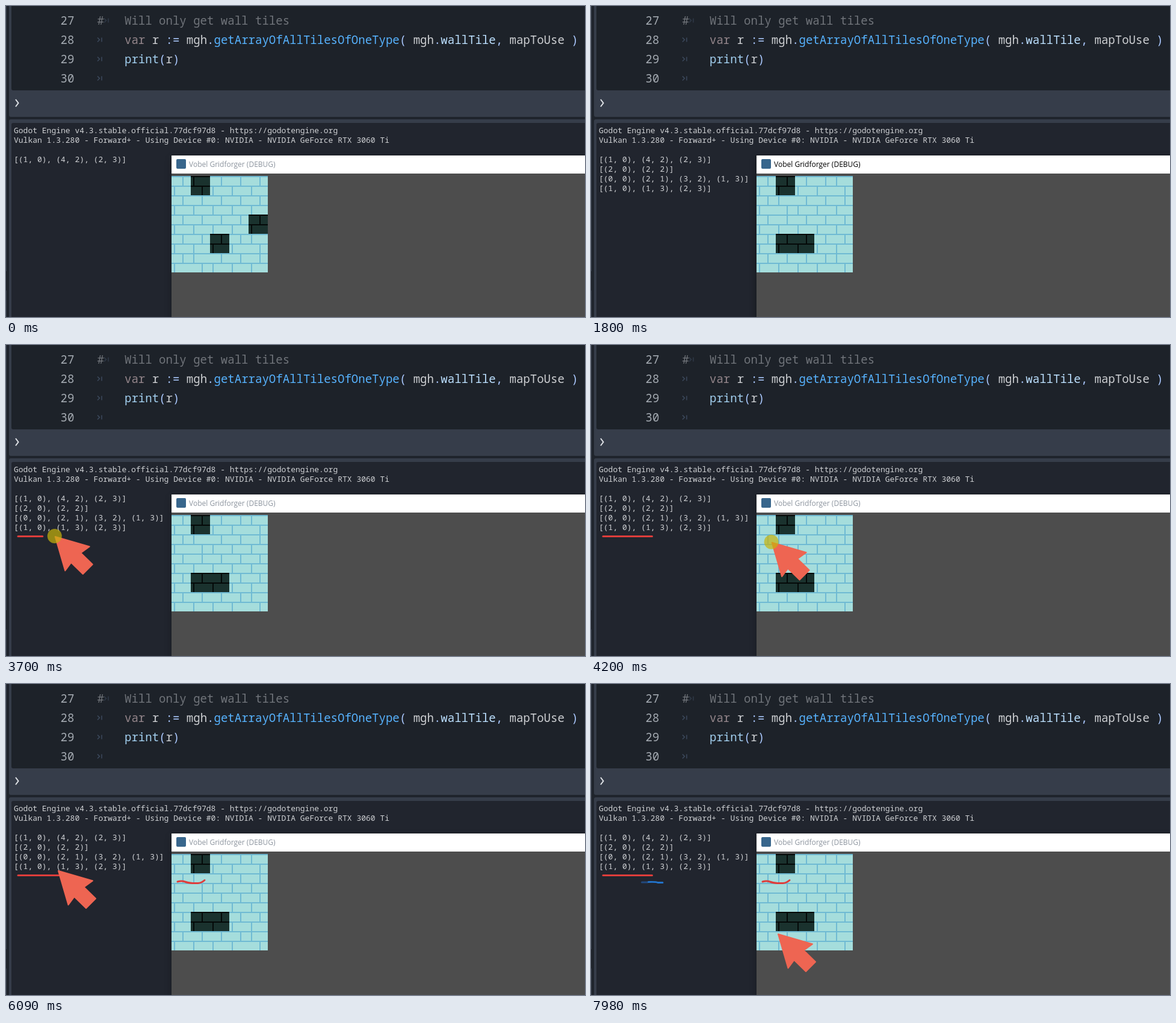
An HTML page for the animation above (8 s loop, 962 by 516 pixels).

```html
<!DOCTYPE html>
<html lang="en">
<head>
<meta charset="utf-8">
<title>Wall tiles</title>
<style>
  html, body { margin: 0; width: 100%; height: 100%; overflow: hidden; background: #21252e; }
  svg { display: block; width: 962px; height: 516px; }
  text { white-space: pre; }
  .code { font: 19.05px "Noto Sans Mono", monospace; fill: #cdcfd2; }
  .log { font: 13px "Noto Sans Mono", monospace; fill: #cfd1d4; }
  .title { font: 12px "Open Sans", "Noto Sans", sans-serif; }
  .num { fill: #a3a9b0; }
  .note { fill: #70747a; }
  .word { fill: #93858a; }
  .sym { fill: #abc9ff; }
  .fn { fill: #57b3ff; }
  .prop { fill: #bce0ff; }
  .call { fill: #a3d0f0; }
  .tab { fill: none; stroke: #3d4a5e; stroke-width: 1.5; }
  .ink { fill: none; stroke-width: 3; stroke-linecap: round; stroke-linejoin: round; }
  .crisp { shape-rendering: crispEdges; }
</style>
</head>
<body>
<svg viewBox="0 0 962 516">
  <defs>
    <filter id="soft" x="-10%" y="-10%" width="120%" height="120%"><feGaussianBlur stdDeviation="6"/></filter>
    <path id="tab" class="tab" d="M1 -3.5L4.500 0L1 3.500M8 -3.500V3.500"/>
  </defs>

  <rect width="962" height="516" fill="#1f242c"/>
  <path class="crisp" d="M0 0H1V440H0ZM0 472H1V516H0Z" fill="#343b48"/>
  <path d="M5 0H962V184H8Q5 184 5 181Z" fill="#363d4a"/>
  <path d="M9 0H962V140H12Q9 140 9 137Z" fill="#1d2229"/>
  <path d="M5 516V191Q5 188 8 188H962V516Z" fill="#363d4a"/>
  <path d="M9 516V197Q9 194 12 194H962V516Z" fill="#21252e"/>
  <path d="M16 155L20.500 161L16 167" fill="none" stroke="#dfe2e6" stroke-width="2"/>

  <g class="code">
    <text class="num" x="90.5" y="31">27</text>
    <text class="num" x="90.5" y="63">28</text>
    <text class="num" x="90.5" y="95">29</text>
    <text class="num" x="90.5" y="127">30</text>
    <use href="#tab" x="162" y="24" opacity=".6"/>
    <use href="#tab" x="151" y="56"/>
    <use href="#tab" x="151" y="88"/>
    <use href="#tab" x="151" y="120"/>
    <text class="note" x="151.5" y="31">#</text>
    <text class="note" x="197" y="31">Will only get wall tiles</text>
    <text x="197" y="63"><tspan class="word">var</tspan> r <tspan class="sym">:=</tspan> mgh<tspan class="sym">.</tspan><tspan class="fn">getArrayOfAllTilesOfOneType</tspan><tspan class="sym">(</tspan> mgh<tspan class="sym">.</tspan><tspan class="prop">wallTile</tspan><tspan class="sym">,</tspan> mapToUse <tspan class="sym">)</tspan></text>
    <text x="197" y="95"><tspan class="call">print</tspan><tspan class="sym">(</tspan>r<tspan class="sym">)</tspan></text>
  </g>

  <g class="log" id="log">
    <text x="13" y="211">Godot Engine v4.3.stable.official.77dcf97d8 - https://godotengine.org</text>
    <text x="13" y="227">Vulkan 1.3.280 - Forward+ - Using Device #0: NVIDIA - NVIDIA GeForce RTX 3060 Ti</text>
  </g>

  <rect id="shade" x="275" y="252" width="720" height="300" filter="url(#soft)"/>
  <g class="crisp">
    <rect x="274" y="247" width="688" height="269" fill="#1d2026"/>
    <rect x="275" y="248" width="687" height="30" fill="#fff"/>
    <rect x="275" y="278" width="687" height="238" fill="#4d4d4d"/>
  </g>
  <rect x="283" y="254" width="16" height="16" rx="2" fill="#38668c"/>
  <text class="title" id="title" x="304" y="267">Vobel Gridforger (DEBUG)</text>
  <g class="crisp" id="maps" transform="translate(275 282)"></g>

  <g id="inks"></g>
  <g id="pointer">
    <path d="M1 1L58 17.500L43.500 28L63 47L47 63L27.500 44L17.500 57.500Z" fill="#ee6552" stroke="#ee6552" stroke-width="2" stroke-linejoin="round"/>
    <circle id="press" r="12" fill="#c8b40c" opacity=".7"/>
  </g>
</svg>
<script>
const LOOP = 8000, STEP = 100;
const TILE = 32, SIZE = 5;
const RED = "#df3d3b", NAVY = "#23497c", BLUE = "#2273cb";
const $ = id => document.getElementById(id);

function add(parent, tag, attrs = {}) {
  const el = document.createElementNS("http://www.w3.org/2000/svg", tag);
  for (const key in attrs) el.setAttribute(key, attrs[key]);
  parent.append(el);
  return el;
}

const show = (el, on) => el.setAttribute("visibility", on ? "visible" : "hidden");
const clamp = v => Math.max(0, Math.min(1, v));
const lerp = (a, b, k) => a + (b - a) * k;
const smooth = k => k * k * (3 - 2 * k);

const rounds = [
  { at: 0, logAt: 0, walls: "(1, 0), (4, 2), (2, 3)" },
  { at: 500, logAt: 600, walls: "(2, 0), (2, 2)" },
  { at: 1200, logAt: 1300, walls: "(0, 0), (2, 1), (3, 2), (1, 3)" },
  { at: 1800, logAt: 1800, walls: "(1, 0), (1, 3), (2, 3)" }
];

function drawTile(parent, col, row, wall, flipped) {
  const x = col * TILE, y = row * TILE;
  const [top, low] = flipped ? [5, 19] : [19, 5];
  add(parent, "rect", { x, y, width: TILE, height: TILE, fill: wall ? "#1a322e" : "#a5dddc" });
  add(parent, "path", {
    d: `M${x} ${y + 1}h32m-32 16h32M${x + top} ${y}v16M${x + low} ${y + 16}v16`,
    stroke: wall ? "#040908" : "#6fbad3", "stroke-width": 2
  });
}

rounds.forEach((round, i) => {
  round.map = add($("maps"), "g");
  for (let n = 0; n < SIZE * SIZE; n++) {
    const col = n % SIZE, row = Math.floor(n / SIZE);
    const wall = round.walls.includes(`(${col}, ${row})`);
    const flipped = (col + 3 * row + 7 * i + 3) % 12 === 4;
    drawTile(round.map, col, row, wall, flipped);
  }
  round.line = add($("log"), "text", { x: 13, y: 259 + i * 16 });
  round.line.textContent = `[${round.walls}]`;
});

// Key points of the pointer; a key with ink is reached by drawing that path
const key = (t, x, y, color, d) => ({ t, x, y, color, d });
const tours = [
  [
    key(2890, 219, 450),
    key(3390, 20, 317),
    key(3790, 101, 317, RED, "M20 317.5H101.500"),
    key(4090, 284, 327),
    key(4390, 331, 326, RED, "M285 328Q292 326 297 328T310 330.500H319Q325 330 330 325.500"),
    key(4590, 429, 396)
  ], [
    key(5490, 121, 466),
    key(5790, 3, 325),
    key(6090, 86, 309),
    key(6390, 104, 316),
    key(6690, 92, 349),
    key(6890, 86, 333),
    key(7190, 106, 329, NAVY, "M84.500 329H94"),
    key(7290, 119, 329, BLUE, "M95.500 328.500Q108 328 111 329.500H119"),
    key(7690, 327, 410),
    key(7890, 310, 414)
  ]
];

const inks = [];
for (const keys of tours) {
  keys.forEach((k, i) => {
    if (!k.d) return;
    const el = add($("inks"), "path", { class: "ink", d: k.d, stroke: k.color, pathLength: 1 });
    inks.push({ el, from: keys[i - 1].t, to: k.t });
  });
}

function movePointer(t) {
  const keys = tours.find(list => t >= list[0].t && t <= list[list.length - 1].t);
  show($("pointer"), keys);
  show($("press"), false);
  if (!keys) return;
  const i = Math.max(1, keys.findIndex(k => t <= k.t));
  const a = keys[i - 1], b = keys[i];
  const part = (t - a.t) / (b.t - a.t);
  const k = b.d ? part : smooth(part);
  $("pointer").setAttribute("transform", `translate(${lerp(a.x, b.x, k)} ${lerp(a.y, b.y, k)})`);
  show($("press"), b.d);
}

// Ink trails the pointer by one step
function drawInk(t) {
  for (const { el, from, to } of inks) {
    const part = clamp((t - STEP - from) / (to - from));
    show(el, part > 0);
    el.setAttribute("stroke-dasharray", `${part} 2`);
  }
}

function render(t) {
  rounds.forEach((round, i) => {
    const next = rounds[i + 1];
    show(round.map, t >= round.at && (!next || t < next.at));
    show(round.line, t >= round.logAt);
  });

  const active = t >= 300 && t < 2400;
  $("title").setAttribute("fill", active ? "#000" : "#8d959f");
  $("shade").setAttribute("opacity", active ? .45 : .25);

  const held = Math.floor((t + 10) / STEP) * STEP - 10;
  movePointer(held);
  drawInk(held);
}

const start = performance.now();
function tick() {
  render((performance.now() - start) % LOOP);
  requestAnimationFrame(tick);
}
tick();
</script>
</body>
</html>
```
